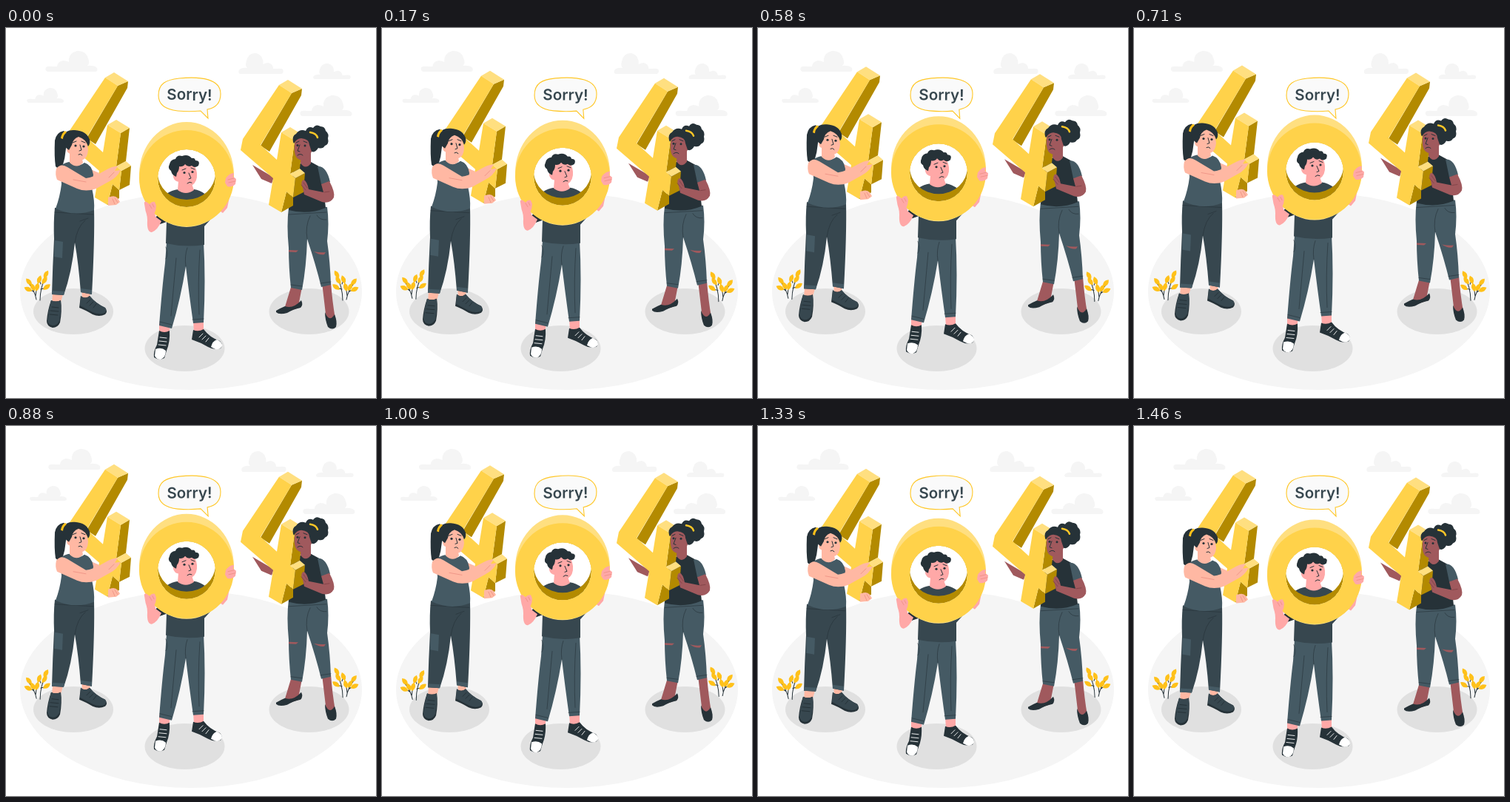
Animation, 500 px wide and 500 px high, one loop 1500 ms. Source, as an HTML page:

```html
<!DOCTYPE html>
<html lang="en">
<head>
<meta charset="utf-8">
<title>404 – Sorry!</title>
<style>
  html, body { margin: 0; height: 100%; overflow: hidden; background: #fff; }
  svg { display: block; width: 100vw; height: 100vh; }
  .ink { fill: #263238; } .dark { fill: #37474f; } .slate { fill: #455a64; }
  .gold { fill: #ffd24a; } .light { fill: #ffdf80; } .shade { fill: #b38a00; } .amber { fill: #ffc11a; }
  .rose { fill: #ffa8a7; } .peach { fill: #ffb8a3; } .brown { fill: #a0595d; }
  .line { fill: none; stroke: #263238; stroke-width: 1; stroke-linecap: round; stroke-linejoin: round; }
  .lace { stroke: #fff; stroke-width: .9; }
  .crease { stroke-width: .8; opacity: .75; }
  .fold { stroke: #eb8f82; stroke-width: .8; }
  text { font: 600 20.5px Inter, "Open Sans", sans-serif; text-anchor: middle; }
</style>
</head>
<body>
<svg viewBox="0 0 500 500">
  <defs>
    <path id="cloud" d="M3 28Q-1 26 1 22Q3 20 11 21H16Q17 14 24 13Q28 13 32 15Q31 3 43 0Q55-1 58 10Q61 17 57 20Q66 19 70 23Q72 28 67 28Z"/>
    <g id="four">
      <path class="shade" d="M386 88L400 82L399 91L356 167L344 159ZM390 152L402 145L397 190L384 197ZM391 203L404 196L402 222L388 229ZM379 221L388 229L388 240L372 249Z"/>
      <path class="light" d="M369 77L381 70L400 82L386 88ZM372 141L384 134L402 145L390 152ZM384 197L397 190L404 196L391 203Z"/>
      <path class="gold" d="M369 77L386 88L344 158L366 178L372 141L390 152L384 197L391 203L388 229L379 221L372 249L355 239L361 203L317 165L320 150Z"/>
    </g>
    <g id="plant">
      <path class="line" d="M46 368Q46 350 55 333M47 353Q52 352 55 350M47 346L45 341M41 367Q39 355 30 344M38 357Q35 354 30 354M40 362Q41 353 42 350"/>
      <g id="leaves" class="amber"></g>
    </g>
  </defs>

  <ellipse cx="250" cy="356" rx="231" ry="133" fill="#f5f5f5"/>
  <g id="clouds" fill="#f5f5f5">
    <use href="#cloud" x="53" y="31"/>
    <use href="#cloud" transform="translate(28 81) scale(.71)"/>
    <use href="#cloud" transform="translate(375 34) scale(-.86 1)"/>
    <use href="#cloud" transform="translate(466 48) scale(-.72 .75)"/>
    <use href="#cloud" x="397" y="91"/>
  </g>
  <g fill="#e0e0e0">
    <ellipse cx="91" cy="383" rx="54" ry="31"/>
    <ellipse cx="241.500" cy="433" rx="54" ry="31"/>
    <ellipse cx="409.500" cy="383" rx="54" ry="31"/>
  </g>
  <g class="wind" data-pivot="250.5 349">
    <use href="#plant"/>
    <use href="#plant" transform="translate(501) scale(-1 1)"/>
  </g>
  <g class="wind" data-pivot="248 94">
    <path fill="#fafafa" stroke="#ffc727" stroke-width="1.100" d="M234 68C264 65 290 69 290 89C290 101 283 108 272 110L273 122L263 112C252 113 243 113 232 112C214 110 206 103 206 91C206 75 216 70 234 68Z"/>
    <text class="dark" x="248" y="97.500">Sorry!</text>
  </g>

  <g id="people">
    <!-- left -->
    <use href="#four" x="-235" y="-10"/>
    <path class="peach" d="M112 190L126 196L122 207L112 204ZM63 358L77 360L73 374L62 372ZM102 352L114 354L113 367L103 366Z"/>
    <path class="ink" d="M61 368Q67 371 74 368Q76 382 73 398Q70 405 63 405Q55 403 55 396Q56 382 61 368ZM101 362Q107 367 113 362Q121 372 134 378Q138 383 134 387Q126 391 117 387Q107 381 99 378Z"/>
    <path class="dark" d="M61 368Q67 371 74 368Q75 382 72 396Q69 402 63 402Q57 401 56 395Q57 382 61 368ZM101 362Q107 367 113 362Q121 372 134 378Q137 382 133 385Q126 388 117 384Q107 379 100 375Z"/>
    <path class="line" d="M62 377L71 378M60 382L71 383M59 387L70 388M109 372L114 367M113 375L118 370M118 378L122 373"/>
    <path class="dark" d="M66 243L119 245Q120 285 116 360L101 357Q98 318 93 290Q89 330 78 361L62 360Q63 322 65 285Q64 262 66 243Z"/>
    <path class="slate" d="M66 287L77 289L76 311L65 309ZM62 355L79 356L78 361L62 360ZM101 352L116 354V360L101 357Z"/>
    <path class="line crease" d="M93 290Q96 269 107 260M100 261L111 257M66 249L118 252"/>
    <path class="ink" d="M78 139Q68 141 66 152Q65 174 67 187Q71 192 76 188Q80 176 81 163L87 148Z"/>
    <path class="slate" d="M74 186Q81 181 87 181Q95 190 106 182Q116 185 118 198L116 216Q120 234 119 246Q93 256 67 244Q73 228 75 211Z"/>
    <path class="peach" d="M86 168V182Q96 191 104 182L102 172ZM68 190Q74 182 83 188L108 203Q118 202 133 193Q145 186 151 187L147 193L155 192Q150 202 140 207L122 217Q108 222 96 217L69 205Q66 198 68 190Z"/>
    <path class="peach" d="M138 229Q147 225 151 230L154 235L149 239L138 240Z"/>
    <path class="line fold" d="M91 205L108 208M144 231L147 238M147 230L151 236M139 202L146 195"/>
    <path class="peach" d="M85 151Q93 143 105 149Q110 154 111 165Q110 176 104 178Q94 180 88 170Q82 170 82 163Z"/>
    <path class="ink" d="M76 147Q80 137 93 138Q109 139 113 151Q114 157 111 160Q108 150 98 147Q90 150 89 158L85 165Q77 160 76 147Z"/>
    <path class="amber" d="M74 149Q75 142 80 139L82 141Q77 145 77 150Z"/>
    <path class="line" d="M90 155L95 153M102 153L107 155M100 158L102 165L99 166M98 171Q101 169 103 172"/>
    <g class="ink"><circle cx="94" cy="159" r="1.600"/><circle cx="105" cy="160" r="1.600"/></g>

    <!-- middle -->
    <path class="rose" d="M207 398L222 402L220 414L207 413ZM253 396L267 395L267 410L254 411Z"/>
    <path class="ink" d="M207 409Q214 413 221 409Q222 424 217 436L214 446Q207 450 200 445Q199 437 204 428ZM253 408Q260 411 267 407Q275 418 289 423Q294 428 290 433Q282 436 273 431Q263 425 251 421Z"/>
    <path fill="#fff" d="M202 434Q210 431 216 436Q216 445 209 448Q203 448 201 443ZM277 431Q279 423 285 421Q293 425 292 430Q289 435 283 434Z"/>
    <path class="line lace" d="M208 418L217 419M207 423L217 424M206 428L216 429M261 418L266 413M265 421L270 416M270 424L274 419"/>
    <path class="slate" d="M217 289H267Q270 340 267 398L253 399Q247 356 243 322Q236 366 224 406L207 402Q211 350 215 318Z"/>
    <path class="line crease" d="M243 322Q241 308 245 297M216 296Q220 306 216 312M230 311L223 389M262 300Q259 345 261 387M208 397L224 401M252 394L267 393"/>
    <path class="dark" d="M207 253L217 224Q224 219 233 218Q244 225 254 218Q262 219 270 225L289 245L268 268V293Q242 297 216 291L217 261L208 265Z"/>
    <path class="ink" d="M202 256L215 243L217 262L208 265Z"/>
    <path class="rose" d="M190 244L201 247L202 255L210 261Q205 273 197 276Q190 276 191 260ZM287 231L300 210L305 214L299 243L293 250L287 246Z"/>
    <path class="rose" d="M233 207L232 219Q243 227 254 219L250 208Z"/>
    <path class="rose" d="M228 189Q233 181 249 183Q257 185 258 196Q259 208 251 213Q241 216 234 208Q227 207 226 201Q226 195 229 195Z"/>
    <path class="ink" d="M228 200Q224 198 223 193Q218 190 221 184Q222 178 229 177Q231 171 238 173Q246 170 251 176Q255 175 256 179Q263 179 260 186Q255 190 251 186Q246 189 242 184Q239 188 234 187Q234 193 231 196L230 201Z"/>
    <path class="line" d="M238 192L243 190M250 189L255 191M247 196L250 203L247 204M245 210Q248 207 251 209"/>
    <g class="ink"><circle cx="241" cy="195.500" r="1.600"/><circle cx="252" cy="194.500" r="1.600"/></g>
    <g fill-rule="evenodd">
      <path class="shade" d="M205 203a39 39 0 0 1 78 0a39 39 0 0 1-78 0ZM205 196a39 36 0 0 1 78 0a39 36 0 0 1-78 0Z"/>
      <path class="light" d="M180 198a64 71 0 0 1 128 0a64 71 0 0 1-128 0ZM205 203a39 39 0 0 1 78 0a39 39 0 0 1-78 0Z"/>
      <path class="gold" d="M180 203a64 65 0 0 1 128 0a64 65 0 0 1-128 0ZM205 203a39 39 0 0 1 78 0a39 39 0 0 1-78 0Z"/>
    </g>
    <path class="rose" d="M187 238Q186 234 190 235L194 238Q197 234 201 235L203 240Q203 246 200 252L191 255Q188 247 187 238ZM297 203Q302 196 308 196L307 201L311 204L310 211Q305 216 299 214L296 209Z"/>
    <path class="line fold" d="M194 239L197 244M198 238L200 242M300 205L308 203M301 209L310 207"/>

    <!-- right -->
    <path class="brown" d="M333 185L362 202L359 210L345 204ZM386 347L400 350L396 371L399 377L384 382L376 380ZM427 344L439 344Q441 370 445 393L433 395Z"/>
    <path class="ink" d="M365 382Q372 378 377 376Q388 380 399 368Q402 374 398 378Q388 380 380 385Q369 388 365 384ZM431 384Q437 399 444 387Q448 397 446 404Q441 409 435 404Q431 394 431 384Z"/>
    <path class="slate" d="M382 243L434 242Q437 264 434 288Q438 316 439 347L426 350Q419 321 407 285Q406 322 400 354L385 351Q382 323 382 297Q379 266 382 243Z"/>
    <path class="brown" d="M382 300L395 300.500L392 303L382 302.500ZM416 302Q424 304 432 303L430 306Q423 307 416 302Z"/>
    <path class="line crease" d="M407 285Q404 268 411 254M382 252L433 249M420 253Q424 260 433 259M385 347L400 349M425 345L439 343"/>
    <path class="ink" d="M388 190Q398 180 412 181L423 187L432 205Q429 222 432 243Q408 253 382 246Q386 224 388 190Z"/>
    <path class="slate" d="M421 187Q433 186 438 208L426 211Z"/>
    <path class="brown" d="M396 169L397 181Q404 193 412 183L412 167Z"/>
    <use href="#four"/>
    <path class="brown" d="M426 211L437 207Q445 222 443 229Q438 238 427 235L403 225L401 216Q397 208 402 205Q407 207 409 218L429 222Z"/>
    <path class="brown" d="M390 158Q390 148 401 147Q414 149 415 160Q413 172 405 177Q397 181 392 174Q389 168 390 158Z"/>
    <path class="ink" d="M388 154Q386 146 392 143Q397 136 405 139Q408 132 415 135Q419 129 425 133Q431 133 432 139Q437 143 435 149Q437 157 431 159Q428 164 422 162Q418 169 413 167L410 158Q410 150 399 149Q393 149 389 156Z"/>
    <path class="line" style="stroke:#ffc727;stroke-width:2.500" d="M411 141Q419 142 421 148"/>
    <path class="line" d="M392 155L396 153M402 153L407 155M397 158L394 166L397 167M394 172Q398 169 401 172"/>
    <g class="ink"><circle cx="394" cy="158.500" r="1.500"/><circle cx="404" cy="159" r="1.500"/></g>
    <path class="line" style="stroke:#7d4146;stroke-width:.8" d="M402 209L407 216M399 212L405 219M430 222L437 221"/>
  </g>
</svg>
<script>
  const $ = s => document.querySelector(s);
  const LOOP = 1500;

  // x, y, angle
  const leaves = [[54, 333, 30], [45, 340, 20], [42, 350, 15], [55, 350, 55], [52, 341, 35], [31, 343, -40], [30, 353, -65], [36, 350, -30]];
  $('#leaves').innerHTML = leaves.map(([x, y, a]) =>
    `<path d="M0 6Q-6 0 0-6Q6 0 0 6" transform="translate(${x} ${y}) rotate(${a})"/>`).join('');

  const mix = (a, b, k) => a + (b - a) * k;
  const bezier = (u, a, b) => 3 * u * (1 - u) ** 2 * a + 3 * u * u * (1 - u) * b + u ** 3;

  function ease(x) {
    let lo = 0, hi = 1;
    for (let i = 0; i < 20; i++) {
      const mid = (lo + hi) / 2;
      if (bezier(mid, .36, .19) < x) lo = mid; else hi = mid;
    }
    return bezier(lo, .07, .97);
  }

  const shakes = [0, -1, 2, -4, 4, -4, 4, -4, 2, -1, 0];
  function shake(p) {
    const i = Math.floor(p * 10);
    return mix(shakes[i], shakes[i + 1], ease(p * 10 - i));
  }

  // Triangle wave: 0, 1, 0, -1, 0
  const sway = p => p < .25 ? 4 * p : p < .75 ? 2 - 4 * p : 4 * p - 4;

  function draw() {
    const p = performance.now() % LOOP / LOOP;
    $('#people').setAttribute('transform', `translate(0 ${-10 * (1 - Math.abs(1 - 2 * p))})`);
    $('#clouds').setAttribute('transform', `translate(${shake(p)} 0)`);
    for (const el of document.querySelectorAll('.wind'))
      el.setAttribute('transform', `rotate(${sway(p)} ${el.dataset.pivot})`);
    requestAnimationFrame(draw);
  }
  draw();
</script>
</body>
</html>
```
